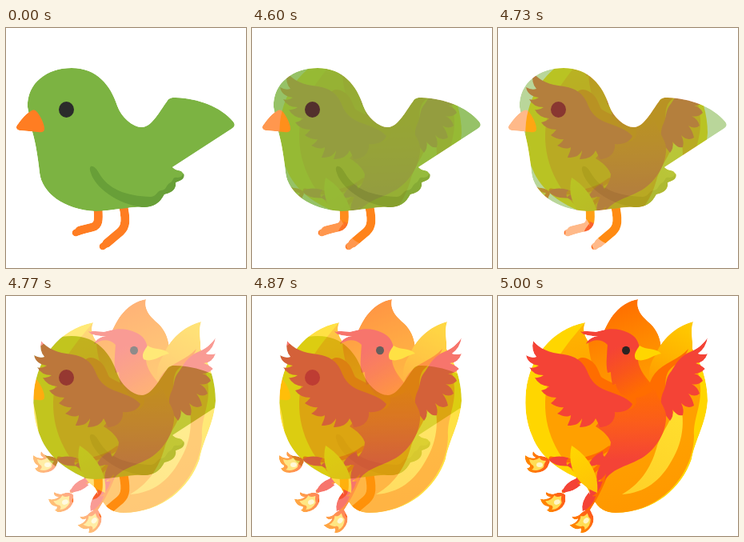
Animation of 300x300 px, one loop 9510 ms. Source, as an HTML page with a canvas:

```html
<!DOCTYPE html>
<html lang="en">
<head>
<meta charset="utf-8">
<title>Bird to phoenix</title>
<style>
html, body { margin: 0; width: 100%; height: 100%; overflow: hidden; background: #fff; }
canvas { display: block; width: 100vw; height: 100vh; }
</style>
</head>
<body>
<canvas id="stage"></canvas>
<script>
const SIZE = 300, LOOP = 9510, STEPS = 15;
const FADE_START = 4533.33, STEP_MS = 100 / 3;
const scale = Math.max(1, window.devicePixelRatio || 1);
const stage = document.getElementById('stage');

function prepare(canvas) {
  canvas.width = canvas.height = SIZE * scale;
  return canvas.getContext('2d');
}

function layer(draw) {
  const canvas = document.createElement('canvas');
  const c = prepare(canvas);
  c.scale(scale, scale);
  c.lineCap = c.lineJoin = 'round';
  draw({
    fill(color, path) { c.fillStyle = color; c.fill(new Path2D(path)); },
    line(color, width, path) {
      c.strokeStyle = color;
      c.lineWidth = width;
      c.stroke(new Path2D(path));
    },
    dot(color, x, y, rx, ry) {
      c.fillStyle = color;
      c.beginPath();
      c.ellipse(x, y, rx, ry, 0, 0, Math.PI * 2);
      c.fill();
    },
    blend(x0, y0, x1, y1, ...colors) {
      const g = c.createLinearGradient(x0, y0, x1, y1);
      colors.forEach((color, i) => g.addColorStop(i / (colors.length - 1), color));
      return g;
    },
    at(x, y, angle, paint) {
      c.save();
      c.translate(x, y);
      c.rotate(angle);
      paint();
      c.restore();
    }
  });
  return canvas;
}

const bird = layer(({ fill, line, dot }) => {
  const green = '#7cb342', shade = '#689f38', orange = '#ff7d22';
  line(orange, 11, 'M115 226 C116 240 116 247 108 249 L92 253');
  line(orange, 9, 'M100 251 L87 256');
  line(orange, 11, 'M147 224 C151 244 149 251 139 258 L126 269');
  line(orange, 9, 'M134 263 L121 273');
  fill(green, `M27 99 C26 68 52 50 82 50 C114 50 131 72 139 97
    C144 111 158 124 170 124 C182 124 192 104 201 92 C204 87 207 87 212 87
    C240 88 268 98 284 117 C287 121 286 123 282 126 L208 174
    C214 180 218 176 221 181 C226 188 214 191 210 195 C212 204 200 206 196 209
    C194 219 182 225 170 224 C155 223 140 228 112 229
    C72 227 45 206 42 181 C40 163 37 143 33 130 Z`);
  fill(shade, `M106 173 C110 172 113 176 116 181 C128 202 150 210 181 211
    C189 210 188 204 194 203 C202 202 199 196 206 193 C210 190 208 186 214 187
    C219 187 221 184 222 181 C225 188 219 191 212 193 C214 203 204 207 198 208
    C193 219 182 225 170 224 C139 220 111 199 106 181 C105 178 104 175 106 173 Z`);
  fill(orange, `M31 104 C35 101 38 103 41 108 C45 114 48 121 48 126
    C48 130 45 131 40 130 L17 128 C12 127 12 123 15 120 C20 113 25 107 31 104 Z`);
  dot('#2b2b2b', 75.5, 102, 9.5, 10);
});

const phoenix = layer(({ fill, line, dot, blend, at }) => {
  const red = '#f44336', orange = '#ff6d00', amber = '#ffa000', yellow = '#ffd600';

  // Flames behind the bird
  fill(yellow, `M109 33 C105 41 108 50 113 57 L200 70 L242 64
    C255 84 262 108 262 131 C260 160 247 178 242 204 C230 239 196 271 147 271
    C134 271 126 266 119 254 L106 230 C82 222 53 203 43 176
    C35 158 33 139 35 118 C40 78 65 42 109 33 Z`);
  fill(blend(110, 40, 150, 270, '#ffb300', amber, amber, '#ff9800'),
    `M109 33 C105 41 108 50 113 57 L200 70 L242 64 C247 82 252 98 253 115
    C254 139 244 153 245 175 C244 226 200 271 147 271 C134 271 126 266 119 254
    L108 232 C80 209 58 175 59 132 C61 87 84 63 109 33 Z`);
  fill(blend(150, 8, 190, 115, orange, '#ff8a00', amber),
    `M175 4 C172 18 181 26 191 35 C205 49 210 73 196 106 C184 121 168 132 154 126
    C130 114 115 94 113 57 C119 52 126 54 131 48 C138 29 151 8 175 4 Z`);
  fill(blend(240, 36, 195, 115, '#ffca00', '#ffb300', '#ff9800'),
    'M244 32 C240 44 244 54 243 65 C239 90 220 107 198 124 C185 108 187 87 197 74 C204 55 221 38 244 32 Z');
  fill(blend(225, 130, 160, 248, '#ffe02e', '#ffd028'),
    'M224 123 C235 149 233 180 217 206 C203 231 184 246 155 248 C181 233 193 210 199 187 C207 165 222 151 224 123 Z');

  // Tail
  line(orange, 5, 'M139 190 Q110 212 66 203');
  line(orange, 5, 'M140 195 Q125 221 82 244');
  line(orange, 6, 'M141 198 Q135 231 112 267');
  const feather = 'M-13 0 Q-4 -8 12 -5 Q7 0 12 5 Q-4 8 -13 0 Z';
  [[76, 206, .12], [99, 211, -.05], [91, 238, -.55], [106, 225, -.7],
   [112, 258, -1.05], [121, 240, -1.1], [130, 220, -1.1], [124, 205, -.6]]
    .forEach(([x, y, angle]) => at(x, y, angle, () => fill(red, feather)));
  fill(blend(93, 190, 120, 245, yellow, '#ffc107'),
    'M92 187 C110 198 127 220 124 246 C101 238 85 215 92 187 Z');

  // Right wing
  fill(orange, `M238 66 C231 84 218 85 212 96 C206 109 213 120 207 137
    L190 140 C185 123 187 109 196 97 C207 83 226 80 238 66 Z`);
  fill(red, `M262 52 C256 61 249 66 240 70 C224 77 221 89 215 96
    C209 104 211 111 207 119 C203 127 203 136 205 143 L215 156
    Q220 150 218 142 Q225 151 231 149 Q233 142 229 134 Q237 142 245 137
    Q243 128 238 122 Q246 127 252 122 Q250 114 242 110 Q250 112 256 106
    Q253 99 245 97 Q253 97 259 91 Q254 86 247 84 Q258 84 262 72
    Q256 74 250 72 Q260 65 262 52 Z`);

  // Body and left wing
  fill(blend(165, 115, 168, 205, orange, '#fb5c1c', red),
    `M137 60 C133 85 146 105 153 120 C140 137 132 151 122 163
    C132 169 139 176 141 183 C140 194 134 202 123 211 C136 211 137 220 133 231
    C143 216 157 214 173 206 C192 198 208 177 210 155
    C212 142 202 133 198 121 C194 109 180 101 174 81 Z`);
  line(orange, 22, 'M106 88 C115 91 115 99 119 106 C125 116 145 119 162 131');
  fill(red, `M44 56 C52 66 64 71 82 73 C97 75 106 82 111 93
    C116 106 122 113 135 118 C148 123 160 126 168 135
    C165 143 155 146 146 145 C147 155 140 164 127 164 C126 160 124 157 122 153
    C119 160 113 164 102 164 C103 160 105 157 105 153 C101 160 97 162 87 162
    C88 158 91 154 91 149 C86 152 80 150 74 147 C77 145 80 143 82 139
    Q74 140 66 134 Q70 131 73 127 Q60 127 54 118 Q60 117 64 113
    Q51 112 46 102 Q52 103 57 99 Q44 99 39 89 Q45 91 51 87
    Q37 85 35 74 Q42 78 48 76 Q41 68 44 56 Z`);

  // Head
  line(red, 4, 'M108 46 Q125 45 145 53');
  fill(red, `M103 44 C113 48 121 45 130 43 C142 40 153 41 163 46
    C172 50 177 58 177 68 L174 81 L145 78 L137 61
    C128 52 118 55 110 60 C115 50 125 49 131 52 C121 49 107 51 103 44 Z`);
  fill(blend(145, 65, 178, 118, red, '#f9551c', orange),
    `M137 59 L176 69 C170 90 189 105 192 119 C180 128 167 130 154 123
    C150 118 148 115 147 110 L143 111 C142 105 141 100 141 95 L137 96
    C134 83 137 72 137 59 Z`);
  fill(yellow, 'M177 62 C185 68 197 64 204 72 C193 74 183 84 172 79 C169 73 173 68 177 62 Z');
  dot('#2b2422', 160, 68, 5, 5.2);

  // Burning tail tips
  const flame = `M-15 -9 Q-8 -4 -2 -6 Q-8 -9 -5 -14 Q-1 -8 5 -8 Q14 -7 16 -1
    Q14 3 13 6 Q8 13 -2 13 Q-11 13 -13 7 Q-9 7 -9 4 Q-16 1 -15 -9 Z`;
  const core = 'M-10 -4 Q-3 -1 3 -6 Q4 -2 11 -2 Q8 2 8 6 Q1 12 -7 9 Q-3 7 -5 4 Q-9 2 -10 -4 Z';
  [[49, 208, 0], [70, 256, -.4], [106, 281, -.85]].forEach(([x, y, angle]) =>
    at(x, y, angle, () => {
      fill(blend(-10, 0, 14, 0, '#ff8400', '#ff5a1c'), flame);
      fill('#ffdd55', core);
      dot('#fff6c8', 3, 3, 4, 3);
    }));
});

const ctx = prepare(stage);

function mixAt(ms) {
  const shown = Math.floor((ms + 5 - FADE_START) / STEP_MS + 0.01) + 1;
  return Math.min(STEPS, Math.max(0, shown)) / STEPS;
}

function put(image, mode, alpha) {
  ctx.globalCompositeOperation = mode;
  ctx.globalAlpha = alpha;
  ctx.drawImage(image, 0, 0);
}

let last = -1;
function render(ms) {
  const mix = mixAt(ms);
  if (mix === last) return;
  last = mix;
  ctx.clearRect(0, 0, stage.width, stage.height);
  put(bird, 'source-over', 1 - mix);
  put(phoenix, 'lighter', mix);
  // Only the stronger shape keeps its outline
  put(mix < 0.5 ? bird : phoenix, 'destination-in', 1);
  ctx.globalCompositeOperation = 'source-over';
  ctx.globalAlpha = 1;
}

const start = performance.now();
function tick() {
  render((performance.now() - start) % LOOP);
  requestAnimationFrame(tick);
}
render(0);
requestAnimationFrame(tick);
</script>
</body>
</html>
```
